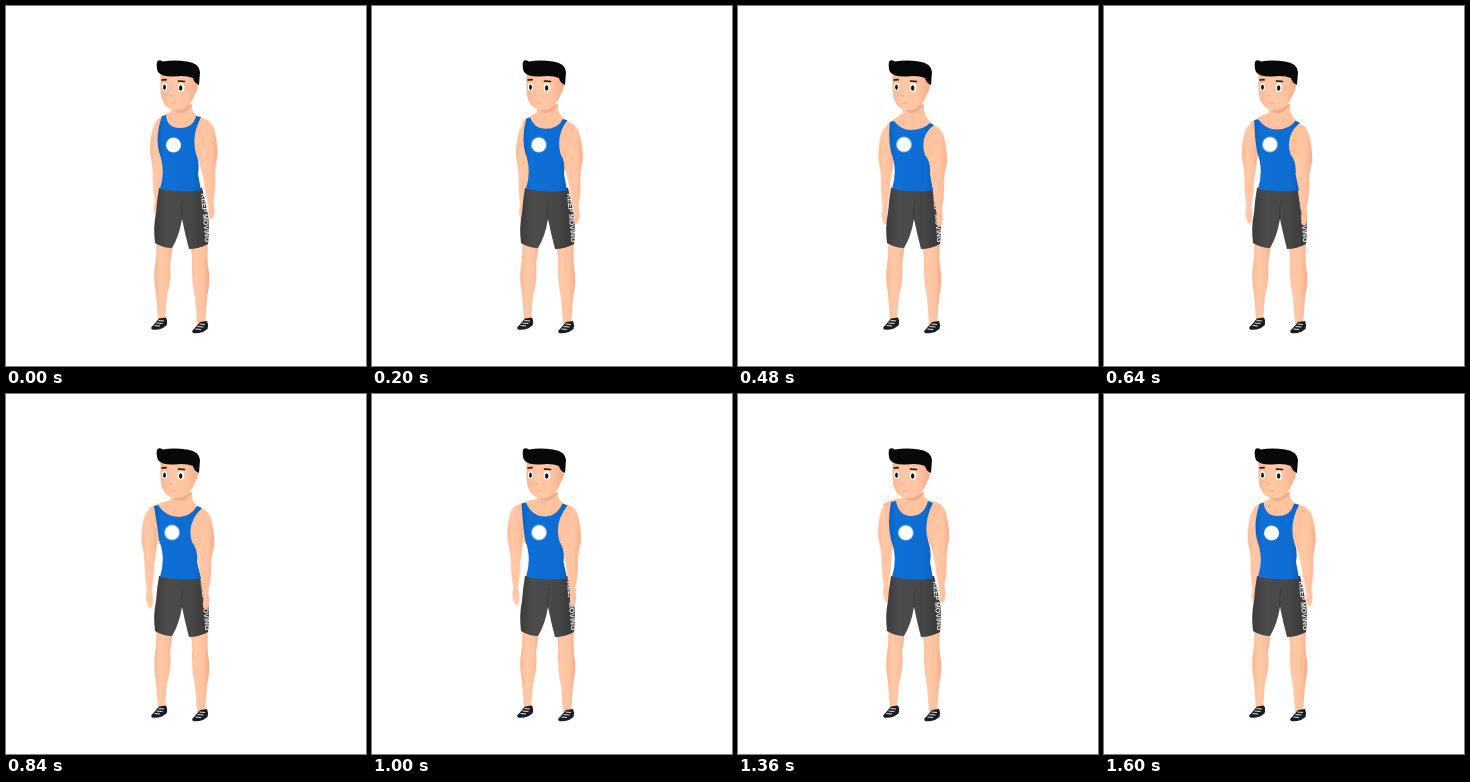
An HTML page without scripts that plays this animation: 360x360 px, repeating every 1640 ms.

```html
<!DOCTYPE html>
<html lang="en">
<head>
<meta charset="utf-8">
<title>Shoulder rolls</title>
<style>
  html, body { margin: 0; width: 100%; height: 100%; overflow: hidden; background: #fff; }
  svg { display: block; width: 100vw; height: 100vh; }
  .side { font: 700 7px "Liberation Sans", Arial, sans-serif; fill: #f4f4f4; }

  /* Each arm follows an ellipse: sine swings in x, y and angle, out of phase. */
  .arm {
    animation: sway 820ms, lift 820ms, twist 820ms;
    animation-timing-function: cubic-bezier(.364, 0, .636, 1);
    animation-iteration-count: infinite;
    animation-direction: alternate;
  }
  .left {
    --x0: .2px; --x1: -9.5px; --y0: 6px; --y1: -4px; --a0: 0deg; --a1: -2deg;
    transform-origin: 152px 118px;
    animation-delay: -1520ms, -1180ms, -1320ms;
  }
  .right {
    --x0: .4px; --x1: -2.4px; --y0: 7.8px; --y1: -4.2px; --a0: 1.6deg; --a1: -.1deg;
    transform-origin: 202px 118px;
    animation-delay: -100ms, -1170ms, -780ms;
  }
  @keyframes sway { from { translate: var(--x0); } to { translate: var(--x1); } }
  @keyframes lift { from { transform: translateY(var(--y0)); } to { transform: translateY(var(--y1)); } }
  @keyframes twist { from { rotate: var(--a0); } to { rotate: var(--a1); } }

  .chest, .shirt, .badge { animation: chest 1640ms linear infinite; }
  .shirt { animation-name: shirt; }
  .badge { animation-name: badge; }
  @keyframes chest {
    0%, 100% { d: path("M165 98V106Q157 108 151 114L153 150H195L203 115Q188 111 186 103V98Z"); }
    29.3% { d: path("M165 98V107Q157 112 149 118L153 150H195L203 124Q188 116 186 104V98Z"); }
    51.2% { d: path("M165 98V106Q152 109 143 114L153 150H195L201 118Q188 113 186 103V98Z"); }
    70.7%, 82.9% { d: path("M165 98V104Q153 105 145 110L153 150H195L204 111Q189 108 186 102V98Z"); }
  }
  @keyframes shirt {
    0%, 100% { d: path("M156 110L160 109Q161 122 174 122Q187 122 190 110L195 111Q185 130 190 148Q194 156 192 168L195 184.500Q174 187 154 183Q160 164 153 146Q149 130 156 110Z"); }
    29.3% { d: path("M152 116L156 115Q163 124 173 124Q185 124 192 117L196 119Q181 130 187 149Q193 156 192 168L195 184.500Q174 187 154 183Q160 164 153 146Q150 132 152 116Z"); }
    51.2% { d: path("M148 112L152 111Q160 123 173 123Q184 123 191 112L196 114Q180 129 186 148Q192 156 191 168L195 184.500Q174 187 154 183Q160 164 153 146Q151 130 148 112Z"); }
    70.7% { d: path("M151 107L156 106Q160 122 173 122Q185 122 190 107L195 109Q184 127 189 147Q194 156 192 168L195 184.500Q174 187 154 183Q160 164 153 146Q150 128 151 107Z"); }
    82.9% { d: path("M153 108L158 107Q161 122 173 122Q186 122 190 107L195 109Q185 128 190 147Q194 156 192 168L195 184.500Q174 187 154 183Q160 164 153 146Q149 128 153 108Z"); }
  }
  @keyframes badge {
    0%, 100% { transform: translate(0, 0); }
    29.3%, 51.2% { transform: translate(-1.5px, -.5px); }
    70.7% { transform: translate(.5px, -.5px); }
  }
</style>
</head>
<body>
<svg viewBox="0 0 360 360" role="img" aria-label="Athlete rolling his shoulders">
  <defs>
    <linearGradient id="skin">
      <stop offset="0" stop-color="#fab691"/>
      <stop offset=".3" stop-color="#ffc9a7"/>
      <stop offset=".7" stop-color="#ffc3a0"/>
      <stop offset="1" stop-color="#f4ac89"/>
    </linearGradient>
    <linearGradient id="blue">
      <stop offset="0" stop-color="#0c60bc"/>
      <stop offset=".15" stop-color="#0e6fd5"/>
      <stop offset=".8" stop-color="#0d6dd3"/>
      <stop offset="1" stop-color="#0b5fb9"/>
    </linearGradient>
    <linearGradient id="grey">
      <stop offset="0" stop-color="#3c3c3c"/>
      <stop offset=".25" stop-color="#4c4c4c"/>
      <stop offset=".7" stop-color="#464646"/>
      <stop offset="1" stop-color="#363636"/>
    </linearGradient>
    <g id="shoe">
      <path d="M8 2L15 1Q17 5 15.500 9L11 12Q5 14 1 13Q-1 11 2 9Z" fill="#1b1d24"/>
      <path d="M7.500 4L13 4.500M5.500 6.500L11.500 7M3.500 9L9 9.500" stroke="#dcdcdc" stroke-width="1.100"/>
    </g>
  </defs>

  <g fill="url(#skin)">
    <path class="arm left" d="M158 112Q150 112 147 122Q143 138 144.500 150Q147 160 146.500 171Q146.500 184 148 194L147 203Q148 211 151 213Q154 212 154 203L153 194Q156 181 156 170Q158 158 160 145Z"/>
    <path d="M150 232Q151 248 149 259Q147 272 150 288L152 314H159L161 290Q166 272 164 258Q166 248 167 232Z"/>
    <path d="M183 232Q187 250 186 262Q186 278 189 292L191 318H199L201 292Q205 274 202 260Q201 250 202 232Z"/>
  </g>
  <use href="#shoe" x="145" y="310.500"/>
  <use href="#shoe" x="186" y="314"/>

  <path fill="url(#grey)" d="M153 182H196Q199 193 202 209Q204 224 202 238Q193 243 183 243Q179 228 176 213Q173 231 166 242Q157 242 149 237Q147 221 150 207Q151 193 153 182Z"/>
  <path d="M176 213Q175 205 177 194" fill="none" stroke="#3b3b3b"/>
  <text class="side" transform="translate(195 187.500) rotate(85)">KEEP MOVING</text>

  <path class="arm right" fill="url(#skin)" d="M190 111Q202 110 207 120Q211 132 211.500 148Q208 163 209 173Q209 185 207 195L208 203Q208 211 205 213Q201 212 202 203L201 195Q198 182 197 172Q194 160 190 146Z"/>
  <path class="chest" fill="#ffc3a0" d="M165 98V106Q157 108 151 114L153 150H195L203 115Q188 111 186 103V98Z"/>
  <path fill="#f1ac89" d="M166 101Q168 107 174 107Q182 106 186 99Z"/>
  <path class="shirt" fill="url(#blue)" d="M156 110L160 109Q161 122 174 122Q187 122 190 110L195 111Q185 130 190 148Q194 156 192 168L195 184.500Q174 187 154 183Q160 164 153 146Q149 130 156 110Z"/>
  <circle class="badge" cx="167.500" cy="139" r="7.500" fill="#fff"/>

  <path fill="url(#skin)" d="M154.500 66V84Q155 96 161 101Q167 106 176 103.500Q185 100 189 88Q193 84 192 68Z"/>
  <g fill="#fff">
    <ellipse cx="158.500" cy="81" rx="2.500" ry="4"/>
    <ellipse cx="175" cy="81.500" rx="3.200" ry="4.300"/>
  </g>
  <g fill="#151515">
    <ellipse cx="158.500" cy="81.300" rx="1.400" ry="2.700"/>
    <ellipse cx="174.700" cy="82" rx="1.700" ry="2.800"/>
    <path d="M151 56Q152 53 157 55.500Q168 53.500 181 55.500Q193 57 194 66L193 79Q188 77 187 72Q180 69 168 70.500Q156 71 152 66Q150 61 151 56Z" fill="#080808"/>
  </g>
  <g fill="none" stroke-linecap="round">
    <path d="M156 74L160 73.700M172.500 75L178.500 75.500" stroke="#1d1512" stroke-width="1.700"/>
    <path d="M163 89Q164 91 166 90M165 97Q167 96.500 170 97" stroke="#e9a482" stroke-width=".9"/>
  </g>
</svg>
</body>
</html>
```
